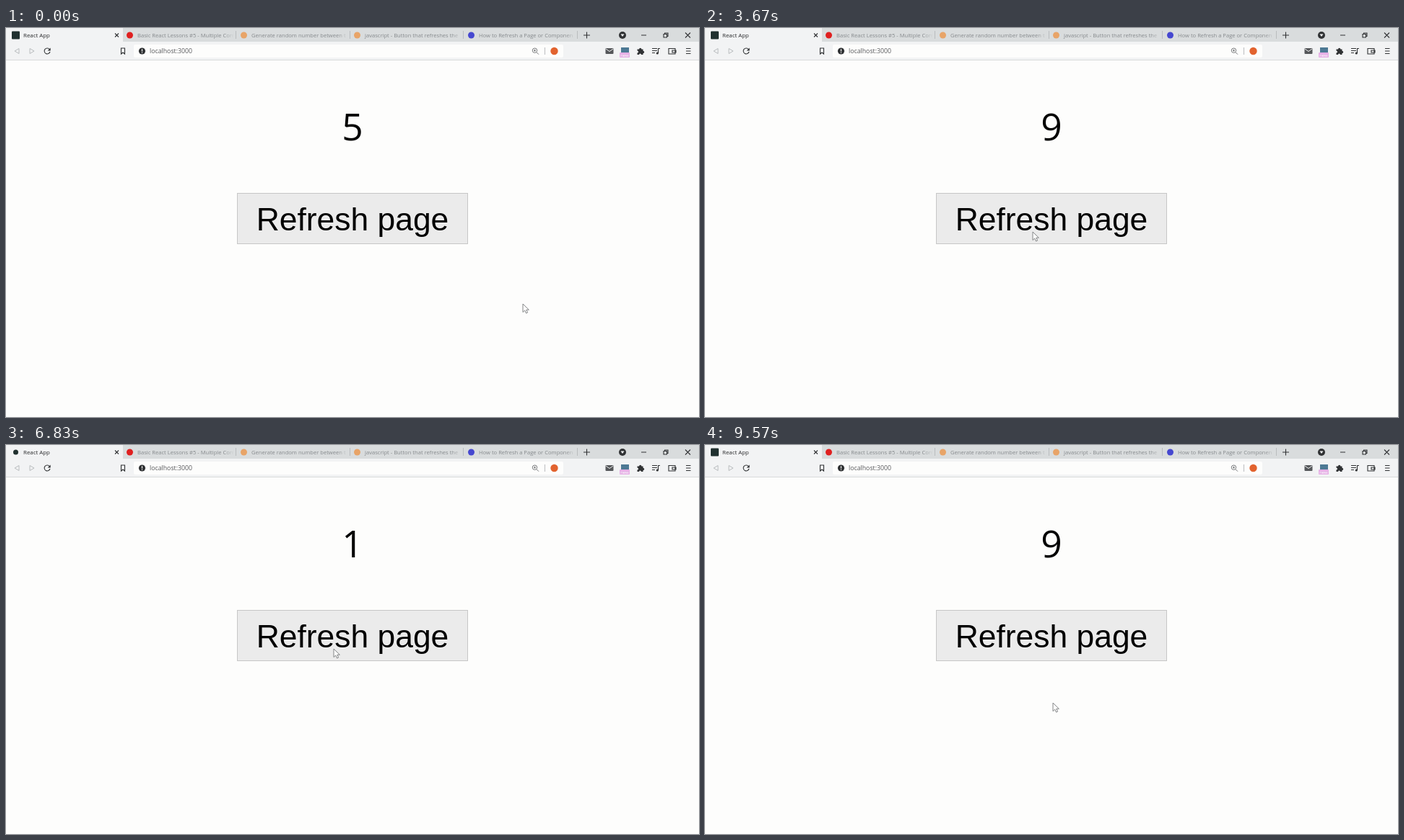
These frames come from a looping animation (960x540 px, 9.61 s). An HTML page:

```html
<!DOCTYPE html>
<html lang="en">
<head>
<meta charset="utf-8">
<title>Refresh page</title>
<style>
  html, body { margin: 0; width: 100%; height: 100%; overflow: hidden; background: #fdfdfc; }
  svg { display: block; width: 960px; height: 540px; }
  text { font-family: "Open Sans", "Noto Sans", sans-serif; }
  .tab { font-size: 7.6px; fill: #868a8d; }
  .line { fill: none; stroke: #303234; stroke-width: 1.1; }
  .faint { fill: none; stroke: #b9bcbe; }
  .dark { fill: #303234; }
</style>
</head>
<body>
<svg viewBox="0 0 960 540">
  <defs>
    <linearGradient id="fade">
      <stop offset="0" stop-color="#d9dcdd" stop-opacity="0"/>
      <stop offset="1" stop-color="#d9dcdd"/>
    </linearGradient>
  </defs>
  <rect width="960" height="540" fill="#fdfdfc"/>
  <rect width="960" height="19" fill="#d9dcdd"/>
  <g id="tabs"></g>
  <path d="M0 0H162V19H960V45H0Z" fill="#f2f3f4"/>
  <path d="M0 44.5H960" stroke="#d8dadb"/>
  <rect x="177" y="23" width="595" height="18" rx="2" fill="#fdfdfc"/>

  <!-- Active tab -->
  <rect id="favicon" fill="#20302f"/>
  <circle id="spinner" cx="13.5" cy="10" r="4.6" fill="none" stroke="#77797b" stroke-width="1.2" stroke-dasharray="21 8"/>
  <text x="24" y="13" font-size="7.9" fill="#292a2c">React App</text>
  <path class="line" d="M151 7.5l5 5m0-5l-5 5"/>

  <!-- Window controls -->
  <path class="line" d="M800 10H809M804.5 5.5V14.5M880 10H887M911 8.5h4.5v4.5h-4.5zM912.5 8.5v-1.5h4.5v4.5h-1.5M941 6.5l7 7m0-7l-7 7"/>
  <circle class="dark" cx="854" cy="10" r="5"/>
  <path d="M851.5 8.5h5l-2.5 3.5z" fill="#f2f3f4"/>

  <!-- Address bar -->
  <path class="faint" d="M18 28.5V35.5L12 32ZM33 28.5V35.5L39 32Z"/>
  <g id="reload">
    <path class="line" d="M60.3 29.5A4 4 0 1 0 61 33" stroke-width="1.3"/>
    <path class="dark" d="M61.7 27.5V31.5H57.7Z"/>
  </g>
  <path id="stop" class="line" d="M53.5 28.5l7 7m0-7l-7 7" stroke-width="1.3"/>
  <path class="line" d="M159.5 28H164.5V36L162 34L159.5 36Z"/>
  <circle class="dark" cx="188.5" cy="32" r="4.6"/>
  <path d="M188.5 29.2V32.5M188.5 33.6V34.8" stroke="#fdfdfc" stroke-width="1.2"/>
  <text x="199" y="35" font-size="8.75" fill="#58595c">localhost:3000</text>
  <g fill="none" stroke="#77797b">
    <circle cx="732.5" cy="31.2" r="3.2"/>
    <path d="M735 33.7L738 36.7M731 31.2h3M732.5 29.7v3"/>
  </g>
  <path d="M746.5 27V37" stroke="#bbbdbf"/>
  <circle cx="759.5" cy="32" r="5.2" fill="#e2632f"/>

  <!-- Toolbar buttons -->
  <rect x="830.5" y="28" width="11" height="8" rx="1" fill="#55575a"/>
  <path d="M831 29l5 3.5 5-3.5" fill="none" stroke="#f2f3f4"/>
  <rect x="852" y="27" width="11" height="8" fill="#4d7994"/>
  <rect x="850" y="34" width="14" height="7" rx="1" fill="#e6b0e6"/>
  <text x="857" y="39.8" font-size="6" text-anchor="middle" fill="#fdfdfc">new</text>
  <path class="dark" d="M874.5 29.5h2.5a1.7 1.7 0 0 1 3.4 0h2.1v2.2a1.7 1.7 0 0 1 0 3.4v2h-2.5a1.5 1.5 0 0 0-3 0h-2.5v-2.5a1.5 1.5 0 0 0 0-3z"/>
  <path class="line" d="M895 28.5h7M895 31.5h7M895 34.5h4M903.5 35V28.5H906"/>
  <circle class="dark" cx="902.3" cy="35" r="1.6"/>
  <path class="line" d="M918 28.5h9v7.5h-9zM923 31h5v3h-5z"/>
  <path class="line" d="M942 28.5h6.5M942 32h6.5M942 35.5h6.5"/>

  <!-- Page -->
  <text id="number" x="480" y="155.5" font-size="51.5" text-anchor="middle"></text>
  <rect id="button" x="320.5" y="229.5" width="319" height="70"/>
  <text x="480" y="280.5" text-anchor="middle" style="font: 44.4px 'Liberation Sans', Arial, sans-serif">Refresh page</text>
  <path id="cursor" d="M0 0V11.5L2.7 9 4.6 13 6.6 12 4.8 8.2H8.4Z" fill="#fdfdfc" stroke="#77797b" stroke-width=".9"/>
</svg>
<script>
const LOOP = 9610;
const $ = id => document.getElementById(id);
const set = (id, attributes) => {
  for (const name in attributes) $(id).setAttribute(name, attributes[name]);
};

const tabs = [
  [166, "Basic React Lessons #5 - Multiple Comp", "#e02020"],
  [324, "Generate random number between t", "#e8a468"],
  [481, "javascript - Button that refreshes the", "#e8a468"],
  [639, "How to Refresh a Page or Componen", "#4648d0"]
];
$("tabs").innerHTML = tabs.map(([x, title, color]) => `
  <circle cx="${x + 5.5}" cy="10" r="4.5" fill="${color}"/>
  <text class="tab" x="${x + 16}" y="13">${title}</text>
  <rect x="${x + 136}" width="14" height="19" fill="url(#fade)"/>
  <rect x="${x + 150}" width="14" height="19" fill="#d9dcdd"/>
  <path class="faint" d="M${x + 152.5} 4V15"/>`).join("");

// Each reload: start, end, number shown afterwards
const reloads = [[2500, 2950, 9], [4330, 4700, 1], [5400, 5800, 1], [6790, 7150, 7], [8500, 8950, 9]];
const SHRINK = 130;

// Pointer: time, x, y
const pointer = [
  [0, 716, 383], [250, 702, 402], [900, 455, 286], [1170, 454, 285],
  [2400, 454, 283], [9100, 454, 283], [9570, 482, 358], [LOOP, 482, 358]
];

function pointerAt(t) {
  const i = pointer.findIndex(key => key[0] > t);
  const [t0, x0, y0] = pointer[i - 1];
  const [t1, x1, y1] = pointer[i];
  const p = (t - t0) / (t1 - t0);
  const ease = p * p * (3 - 2 * p);
  return [x0 + (x1 - x0) * ease, y0 + (y1 - y0) * ease];
}

function draw(t) {
  let number = 5, size = 11, loading = false;
  for (const [start, end, result] of reloads) {
    if (t >= end) number = result;
    if (t >= start && t < end + SHRINK) size = 7;
    if (t >= start + SHRINK && t < end) loading = true;
  }
  $("number").textContent = number;
  set("favicon", {
    x: 13.5 - size / 2, y: 10 - size / 2, width: size, height: size,
    rx: size < 11 ? size / 2 : 1
  });
  set("spinner", {
    visibility: loading ? "visible" : "hidden",
    transform: `rotate(${t * 0.36} 13.5 10)`
  });
  set("reload", { visibility: loading ? "hidden" : "visible" });
  set("stop", { visibility: loading ? "visible" : "hidden" });

  const [x, y] = pointerAt(t);
  const inside = x > 320 && x < 640 && y > 229 && y < 300;
  // A reloaded page notices the pointer only once it moves again
  const hover = inside && (t < 2950 || t > 9100);
  set("button", {
    fill: hover ? "#e1e1e1" : "#ebebeb",
    stroke: hover ? "#a9a9a9" : "#c6c6c6"
  });
  set("cursor", { transform: `translate(${x} ${y})` });
}

const origin = performance.now();
function tick() {
  draw((performance.now() - origin) % LOOP);
  requestAnimationFrame(tick);
}
tick();
</script>
</body>
</html>
```
